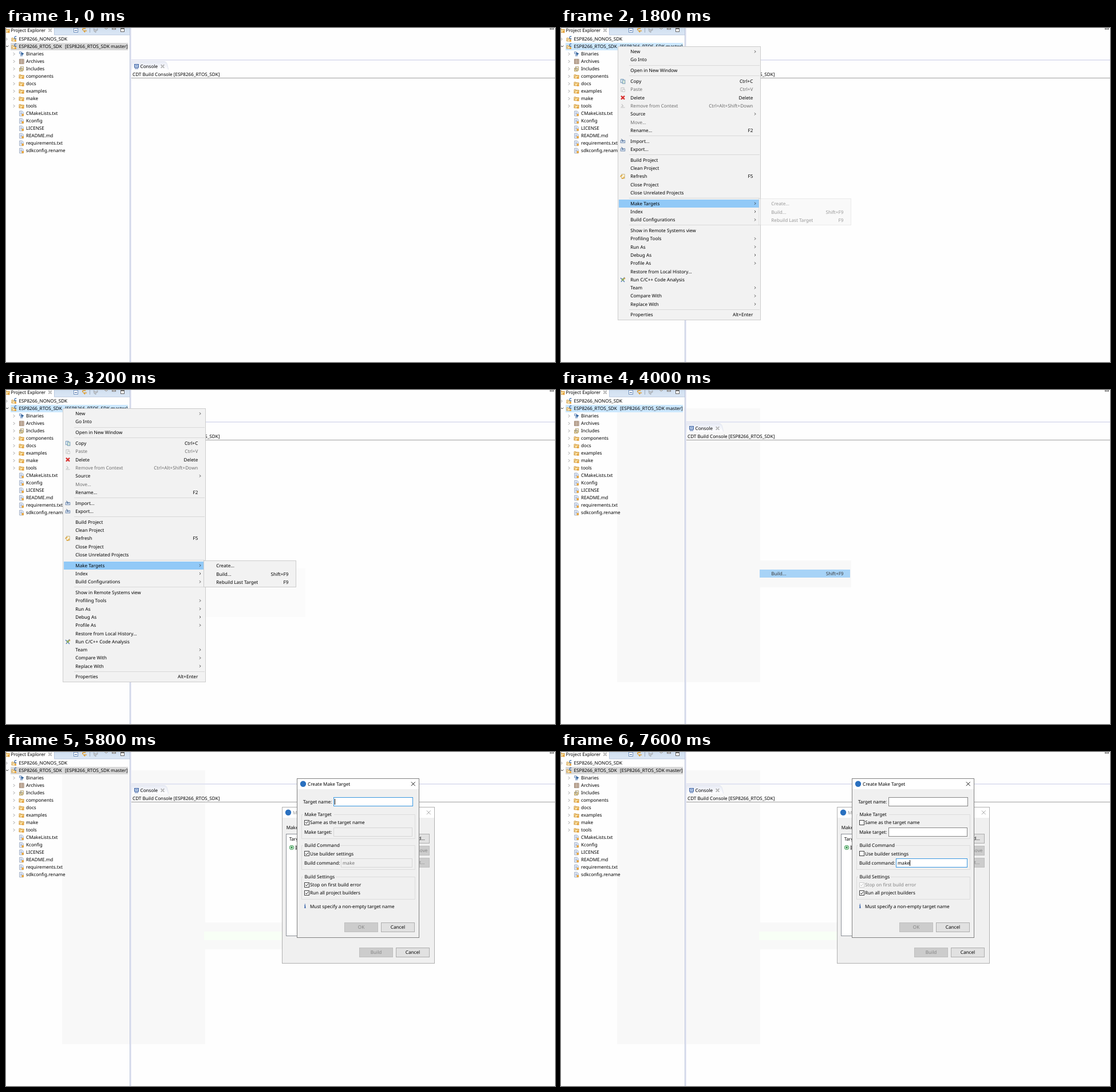
Write an HTML page that moves like this. It is 959x584 px and loops after 8000 ms.

```html
<!DOCTYPE html>
<html lang="en">
<head>
<meta charset="utf-8">
<title>Make target walkthrough</title>
<style>
html, body { margin: 0; width: 100%; height: 100%; overflow: hidden; background: #fff; }
svg { display: block; width: 959px; height: 584px; }
text { font: 8.15px "Noto Sans", "Noto Sans CJK SC", "Open Sans", sans-serif; text-rendering: geometricPrecision; white-space: pre; }
</style>
</head>
<body>
<svg id="stage" viewBox="0 0 959 584"></svg>
<script>
const LOOP = 8000;
const FOCUS = '#3a97e0', FIELD = '#868686';

// Shape helpers: text is placed by its vertical centre, boxes by their outer edges.
const text = (x, cy, s, fill = '#000', anchor = 'start', extra = '') =>
  `<text x="${x}" y="${Math.round(cy + 2.9)}" fill="${fill}" text-anchor="${anchor}" ${extra}>${s}</text>`;
const rect = (x, y, w, h, fill) => `<rect x="${x}" y="${y}" width="${w}" height="${h}" fill="${fill}"/>`;
const outline = (x, y, w, h, fill, stroke, sw) =>
  `<rect x="${x + sw / 2}" y="${y + sw / 2}" width="${w - sw}" height="${h - sw}" fill="${fill}" stroke="${stroke}" stroke-width="${sw}"/>`;
// A one pixel frame on whole pixels.
const box = (x, y, w, h, fill, stroke) => {
  const [left, top, right, bottom] = [x, y, x + w, y + h].map(Math.round);
  return outline(left, top, right - left, bottom - top, fill, stroke, 1);
};
const path = (d, stroke, sw = 1, fill = 'none') =>
  `<path d="${d}" stroke="${stroke}" stroke-width="${sw}" fill="${fill}"/>`;
const dot = (x, y, r, fill) => `<circle cx="${x}" cy="${y}" r="${r}" fill="${fill}"/>`;
const group = (name, ...parts) => `<g class="${name}">${parts.join('')}</g>`;
const cross = (x, y, r, color, sw = 1) =>
  path(`M${x - r} ${y - r}l${2 * r} ${2 * r}m0 ${-2 * r}l${-2 * r} ${2 * r}`, color, sw);
const chevron = (x, y, color, r = 2.3) => path(`M${x - r / 2} ${y - r}l${r} ${r}l${-r} ${r}`, color, .9);

// Small icons, centred on x, y.
const icons = {
  folder: (x, y) => path(`M${x - 4} ${y + 3.5}v-6h3l1 1.2h4v1.3`, '#d39a3c', 1, '#fdf0cf') +
    path(`M${x - 4} ${y + 3.5}l2-4.6h6.5l-2 4.6z`, '#d39a3c', 1, '#fbe3a6') + rect(x + 1, y + 1, 3.5, 3.5, '#e6a33c'),
  file: (x, y) => path(`M${x - 3.3} ${y - 4}h4.5l2 2v6.5h-6.5z`, '#8a9cba', .9, '#fbfcff') +
    path(`M${x - 2} ${y - 1.5}h3.6m-3.6 1.7h3.6m-3.6 1.7h2.4`, '#7d97c6', .8) + rect(x + .5, y + .8, 3.5, 3.8, '#e6a33c'),
  project: (x, y) => path(`M${x - 4.5} ${y + 4}v-5.5h2.5l1 1h3.5`, '#d0a04c', 1, '#fdf0cf') +
    path(`M${x - 4.5} ${y + 4}l1.8-3.6h5.5l-1.8 3.6z`, '#d0a04c', .9, '#fbe9bd') +
    rect(x + .5, y + 1.8, 3, 3, '#e6a33c') + path(`M${x + 3.8} ${y - 4}a2.2 2.2 0 1 0 0 3.6`, '#3e6ca8', 1.2),
  binaries: (x, y) => outline(x - 4, y - 4, 4, 4, '#d5e3f4', '#6d8dba', .8) + outline(x - 2, y, 4, 4, '#d5e3f4', '#6d8dba', .8) +
    path(`M${x} ${y - 3}l4.5 2.8l-4.5 2.8z`, 'none', 0, '#35659c'),
  archives: (x, y) => outline(x - 4, y - 4, 8.5, 8.5, '#f3ece0', '#8b6d57', .9) +
    path(`M${x - 4} ${y - 1}h8m-8 2.7h8M${x - 1.2} ${y - 4}v8m2.9-8v8`, '#8b6d57', .8),
  includes: (x, y) => outline(x - 2, y - 4, 6, 7, '#fff', '#a58e53', .8) + outline(x - 4, y - 1.5, 6.5, 6, '#f3dda0', '#a58e53', .8) +
    path(`M${x + 1} ${y - 1}a1.8 1.8 0 1 0 0 3`, '#5a6f98', .9),
  copy: (x, y) => outline(x - 4, y - 4, 5.5, 7, '#e8f0f7', '#6c95b5', .9) + outline(x - 1, y - 2.5, 5.3, 7, '#d9e9d9', '#6c95b5', .9),
  paste: (x, y) => outline(x - 3.5, y - 3.5, 6, 7.5, '#eee', '#c2c2c2', .9) + outline(x - .5, y - .5, 4.5, 5, '#fafafa', '#c2c2c2', .9),
  remove: (x, y) => cross(x, y, 3, '#d8302f', 2.4),
  context: (x, y) => path(`M${x - 3.5} ${y + 3}h7M${x - 2} ${y - 3}l2.5 3.5l-3 1`, '#bdbdbd', 1.1),
  port: (x, y) => outline(x - 4.3, y - 1.5, 8.5, 5, '#dbe6f3', '#6682a8', .9) + path(`M${x - 3} ${y - 3.5}q3 0 3 4m-1.6-1l1.6 1.7l1.7-1.7`, '#41608e', .9),
  refresh: (x, y) => outline(x - 2.5, y - 4, 6, 8, '#fff6dc', '#b8a069', .8) + path(`M${x - 4} ${y + 1}q0-3 3.5-3m-1.5 5.5q4 .5 4.2-3`, '#dfa12b', 1.4),
  analysis: (x, y) => path(`M${x - 4} ${y - 3}l7 7M${x - 3} ${y + 4}l6-8`, '#4d7ab4', 1.4) + dot(x, y, 2.2, '#8fae6a') + dot(x + 3, y - 2, 1.3, '#d9a441'),
};

function explorer() {
  const rows = [
    ['Binaries', 'binaries'], ['Archives', 'archives'], ['Includes', 'includes'],
    ...['components', 'docs', 'examples', 'make', 'tools'].map(n => [n, 'folder']),
    ...['CMakeLists.txt', 'Kconfig', 'LICENSE', 'README.md', 'requirements.txt', 'sdkconfig.rename'].map(n => [n, 'file']),
  ];
  const tree = rows.map(([name, icon], i) => {
    const y = 45 + 13 * i;
    return (icon === 'file' ? '' : chevron(14, y + .5, '#8a8a8a')) + icons[icon](27, y + .3) + text(35, y, name);
  }).join('');
  return rect(85, 0, 131, 12, 'url(#strip)') + path('M84.5 0v12H216', '#b9c8df') +
    icons.folder(2, 4) + text(8.5, 4.3, 'Project Explorer') + cross(77, 4, 2.6, '#8d8d8d', 1.6) + cross(77, 4, 2.4, '#fff', .6) +
    box(118, 0, 8, 8, '#fff', '#6f90bd') + path('M120 4.5h4', '#345f9c') +
    path('M134 1h4l-2-2m5 6h-5l2 2.5m-4-3.5v-3', '#dc9e35', 1.7) + path('M146.5 0v8', '#9aa9bd') +
    path('M153 1l4 2.5l3-2.5v3l-3 1v3l-3-2z', '#9da3ab', .8, '#c4c9ce') + path('M172.5 0h5l-2.5 2.5z', '#777', .8, '#fff') +
    box(185, 0, 7, 3, '#fff', '#777') + box(200, 0, 7, 7, '#fff', '#666') + path('M200 1.5h7', '#666') +
    chevron(1, 19.5, '#8a8a8a') + icons.project(14.5, 19) + text(22.5, 19, 'ESP8266_NONOS_SDK') +
    rect(8, 26, 205, 13, '#d9d9d9') + group('rowBlue', rect(8, 26, 205, 13, '#cce8ff')) +
    path('M0 31l2 2l2.3-2.3', '#404040', 1) + icons.project(14.5, 32) + text(22.5, 32, 'ESP8266_RTOS_SDK') +
    text(103, 32, '[ESP8266_RTOS_SDK master]') + tree;
}

function consolePane() {
  return rect(216, 0, 1, 584, '#b9c3da') + rect(217, 0, 2, 584, '#e4e6f3') +
    rect(219, 55, 740, 2, '#e1e3f1') +
    path('M219 73.5V58.5H276q4 0 5.5 5l2 9', '#dfe3ee', 1, 'url(#tab)') +
    outline(224, 63, 8, 6.5, '#dceafa', '#3d62a3', 1.2) + path('M226 66h4M225 71h6', '#3d62a3') +
    text(234.5, 67.3, 'Console') + cross(273.5, 67, 2.8, '#8d8d8d', 1.6) + cross(273.5, 67, 2.6, '#fff', .6) +
    text(221, 81.5, 'CDT Build Console [ESP8266_RTOS_SDK]') + rect(219, 87, 740, 1, '#a0a0a0') +
    box(950, 0, 7, 3, '#fff', '#777');
}

// Entries: 'Label|shortcut', '>' marks a submenu, '~' a disabled entry, '-' a separator.
function menu(x, y, w, h, entries, marks = {}, pics = {}) {
  let cy = y + 9.3, out = box(x, y, w, h, '#f2f2f2', '#cccccc');
  for (const entry of entries) {
    if (entry === '-') {
      out += rect(x + 20, Math.round(cy - 5.3), w - 22, 1, '#d9d9d9');
      cy += 4.47;
      continue;
    }
    const [label, key = ''] = entry.replace(/^~/, '').split('|');
    const color = entry[0] === '~' ? '#6d6d6d' : '#000';
    if (marks[label]) out += group(marks[label], rect(x + 2, Math.round(cy - 7), w - 5, 14, '#91c9f7'));
    if (pics[label]) out += icons[pics[label]](x + 9, cy);
    out += text(x + 22.3, cy, label, color);
    out += key === '>' ? chevron(x + w - 10, cy, '#333', 2) : text(x + w - 13.7, cy, key, color, 'end');
    cy += 14.3;
  }
  return out;
}

const contextMenu = () => menu(99, 32, 250, 479, [
  'New|>', 'Go Into', '-', 'Open in New Window', '-',
  'Copy|Ctrl+C', '~Paste|Ctrl+V', 'Delete|Delete', '~Remove from Context|Ctrl+Alt+Shift+Down', 'Source|>', '~Move...', 'Rename...|F2', '-',
  'Import...', 'Export...', '-',
  'Build Project', 'Clean Project', 'Refresh|F5', 'Close Project', 'Close Unrelated Projects', '-',
  'Make Targets|>', 'Index|>', 'Build Configurations|>', '-',
  'Show in Remote Systems view', 'Profiling Tools|>', 'Run As|>', 'Debug As|>', 'Profile As|>', 'Restore from Local History...',
  'Run C/C++ Code Analysis', 'Team|>', 'Compare With|>', 'Replace With|>', '-', 'Properties|Alt+Enter',
], { 'Close Unrelated Projects': 'hlClose', 'Make Targets': 'hlMake', Index: 'hlIndex' },
{ Copy: 'copy', Paste: 'paste', Delete: 'remove', 'Remove from Context': 'context', 'Import...': 'port', 'Export...': 'port',
  Refresh: 'refresh', 'Run C/C++ Code Analysis': 'analysis' });

const makeMenu = () => menu(345, 298, 162, 47, ['Create...', 'Build...|Shift+F9', 'Rebuild Last Target|F9'],
  { 'Create...': 'hlCreate', 'Build...': 'hlBuild' });
const indexMenu = () => menu(345, 312, 178, 85, ['Rebuild', 'Update with Modified Files', 'Re-resolve Unresolved Includes', '-',
  'Search for Unresolved Includes', '-', 'Create Parser Log File']);

function button(x, y, w, label, look = 'normal') {
  const [fill, stroke, color] = {
    normal: ['#e1e1e1', '#adadad', '#000'], off: ['#cccccc', '#bfbfbf', '#838383'],
    main: ['#e1e1e1', FOCUS, '#000'], hover: ['#e0edf6', '#3f7fa8', '#000'],
  }[look];
  return box(x, y, w, 17, fill, stroke) + text(x + w / 2, y + 8.3, label, color, 'middle');
}

const field = (x, y, w, stroke, fill = '#fff') => box(x, y, w, 16, fill, stroke);
const windowFrame = (x, y, w, h, title, border, ink) =>
  box(x, y, w, h, '#f0f0f0', border) + rect(x + 1, y + 1, w - 2, 18, '#fff') +
  dot(x + 11, y + 9.8, 5.2, '#2a70bf') + text(x + 19, y + 10, title, ink) + cross(x + w - 10.7, y + 9.8, 3.4, ink, .9);

function targetsDialog() {
  const frame = (border, ink) => windowFrame(482, 96, 267, 274, 'Make Targets', border, ink);
  return frame('#808080', '#000') + group('inactive', frame('#b0b0b0', '#999')) +
    text(489.7, 131.7, 'Make Targets for: ESP8266_RTOS_SDK') +
    box(489, 143, 209, 179, '#fff', '#8b8f96') + rect(594, 144, 1, 177, '#ececec') +
    text(494.7, 152, 'Target') + text(598, 152, 'Location') +
    rect(504, 162, 33, 10, '#f0f0f0') + dot(499, 167, 4.1, '#3f9b57') + dot(499, 167, 3.1, '#e9f7ea') + dot(499, 167, 1.9, '#3f9b57') +
    text(505, 167, '面板设置', '#000', 'start', 'style="font-size:8px;font-family:\'Noto Sans CJK SC\',\'Noto Sans CJK\',sans-serif"') +
    button(702, 143, 38, 'Add...', 'main') + group('addHover', button(702, 143, 38, 'Add...', 'hover')) +
    group('inactive', button(702, 143, 38, 'Add...')) +
    button(702, 164, 38, 'Remove', 'off') + button(702, 185, 38, 'Edit...', 'off') +
    button(617, 342, 59, 'Build', 'off') + button(681, 342, 59, 'Cancel');
}

const tick = (cy, color = '#111') => path(`M523 ${cy}l1.8 1.9l3.1-3.8`, color, 1);
const square = (cy, color = '#404040') => box(521, cy - 4.4, 9, 9, '#fff', color);
const fieldset = (cy, h, label, gap) => {
  const top = Math.round(cy) + .5;
  return path(`M519 ${top}H516.5v${h}H714.5v${-h}H${gap}`, '#dcdcdc') + text(521.5, cy, label);
};

function createDialog() {
  return windowFrame(508, 46, 214, 279, 'Create Make Target', '#808080', '#000') +
    text(519, 87, 'Target name:') + field(572, 79, 139, FIELD) +
    group('nameFocus', field(572, 79, 139, FOCUS)) + group('nameCaret', rect(574, 82, 1, 10, '#000')) +
    fieldset(109, 42, 'Make Target', 573) + square(123) +
    group('sameHover', square(123, FOCUS)) + group('sameTick', tick(123)) +
    text(531, 123.2, 'Same as the target name') + text(521, 139.6, 'Make target:') +
    field(572, 132, 138, '#d6d6d6', '#f0f0f0') + group('targetOn', field(572, 132, 138, FIELD)) +
    fieldset(163.4, 42, 'Build Command', 584) + square(177.8) +
    group('builderHover', square(177.8, FOCUS)) + group('builderTick', tick(177.8)) +
    text(531, 177.8, 'Use builder settings') + text(521, 194.2, 'Build command:') +
    field(585, 186, 125, '#d6d6d6', '#f0f0f0') + text(588, 194.2, 'make', '#6d6d6d') +
    group('commandOn', field(585, 186, 125, FIELD), group('commandFocus', field(585, 186, 125, FOCUS)), text(588, 194.2, 'make')) +
    group('commandCaret', rect(609, 189, 1, 10, '#000')) +
    fieldset(218, 39, 'Build Settings', 576) +
    group('stopOn', square(232.2), tick(232.2), text(531, 232.2, 'Stop on first build error')) +
    group('stopOff', square(232.2, '#cccccc'), tick(232.2, '#bbb'), text(531, 232.2, 'Stop on first build error', '#838383')) +
    square(246.5) + tick(246.5) + text(531, 246.5, 'Run all project builders') +
    text(520.7, 270.3, 'i', '#1c4fa0', 'start', 'style="font:bold 9.5px \'Noto Serif\',serif"') +
    text(531, 270.5, 'Must specify a non-empty target name') +
    button(591, 298, 59, 'OK', 'off') + button(655, 298, 59, 'Cancel');
}

document.getElementById('stage').innerHTML =
  `<defs>
    <linearGradient id="strip" x2="0" y2="1"><stop stop-color="#d0dff0"/><stop offset="1" stop-color="#dbe7f5"/></linearGradient>
    <linearGradient id="tab" x2="0" y2="1"><stop stop-color="#e8ebf5"/><stop offset="1" stop-color="#fff"/></linearGradient>
  </defs>` +
  rect(0, 0, 959, 584, '#fefefe') +
  group('shade', rect(98, 32, 250, 479, '#f8f8f8'), rect(348, 298, 159, 47, '#f8f8f8')) +
  group('indexShade', rect(348, 312, 175, 85, '#fafafa')) +
  consolePane() + explorer() +
  group('itemShade', rect(346, 314, 159, 15, '#f8fff6')) +
  group('menu', contextMenu()) + group('sub', makeMenu()) + group('index', indexMenu()) +
  group('item', rect(347, 314, 158, 14, '#91c9f7'), text(367.3, 321.3, 'Build...'), text(493.5, 321.3, 'Shift+F9', '#000', 'end')) +
  group('targets', targetsDialog()) + group('create', createDialog());

// Opacity tracks: "ms:opacity", each value held until the next.
const tracks = {
  rowBlue: '0:0 600:1 4200:0',
  menu: '0:0 1400:.35 1500:.7 1600:1 4000:0',
  hlClose: '0:0 1600:1 1800:0',
  hlMake: '0:0 1800:1 2000:0 2200:1 2700:0 3000:1',
  hlIndex: '0:0 2000:1 2200:0 2700:1 3000:0',
  sub: '0:0 1800:.4 1900:.8 2000:0 2200:.35 2300:.7 2400:1 2700:0 3000:.35 3100:.7 3200:1 4000:0',
  index: '0:0 2000:.3 2200:0 2700:1 3000:0',
  indexShade: '0:0 2200:1 2700:0 3000:.5 4000:0',
  hlCreate: '0:0 3300:1 3400:0',
  hlBuild: '0:0 3400:1',
  shade: '0:0 4000:1',
  item: '0:0 4000:.78 4100:.5 4200:.2 4300:0',
  itemShade: '0:0 4300:1',
  targets: '0:0 4100:.3 4200:.7 4300:1',
  addHover: '0:0 5400:1',
  inactive: '0:0 5500:1',
  create: '0:0 5500:.3 5600:.7 5700:1',
  nameFocus: '0:1 6600:.5 6700:0',
  nameCaret: '0:1 5900:0 6300:1 6500:0',
  sameHover: '0:0 6300:.5 6400:1 6700:.5 6800:0',
  sameTick: '0:1 6500:0',
  targetOn: '0:0 6500:.5 6600:1',
  builderHover: '0:0 6900:.5 7000:1 7200:.5 7300:0',
  builderTick: '0:1 7100:0',
  commandOn: '0:0 7100:1',
  commandFocus: '0:0 7400:.5 7500:1',
  commandCaret: '0:0 7600:1',
  stopOn: '0:1 7200:0',
  stopOff: '0:0 7200:1',
};
const style = document.createElement('style');
style.textContent = Object.entries(tracks).map(([name, track]) => {
  const keys = track.split(' ').map(k => k.split(':'));
  const steps = [...keys, [LOOP, keys[keys.length - 1][1]]].map(([ms, o]) => `${ms / LOOP * 100}%{opacity:${o}}`).join('');
  return `@keyframes ${name}{${steps}} .${name}{animation:${name} ${LOOP}ms step-end infinite}`;
}).join('\n');
document.head.append(style);
</script>
</body>
</html>
```
